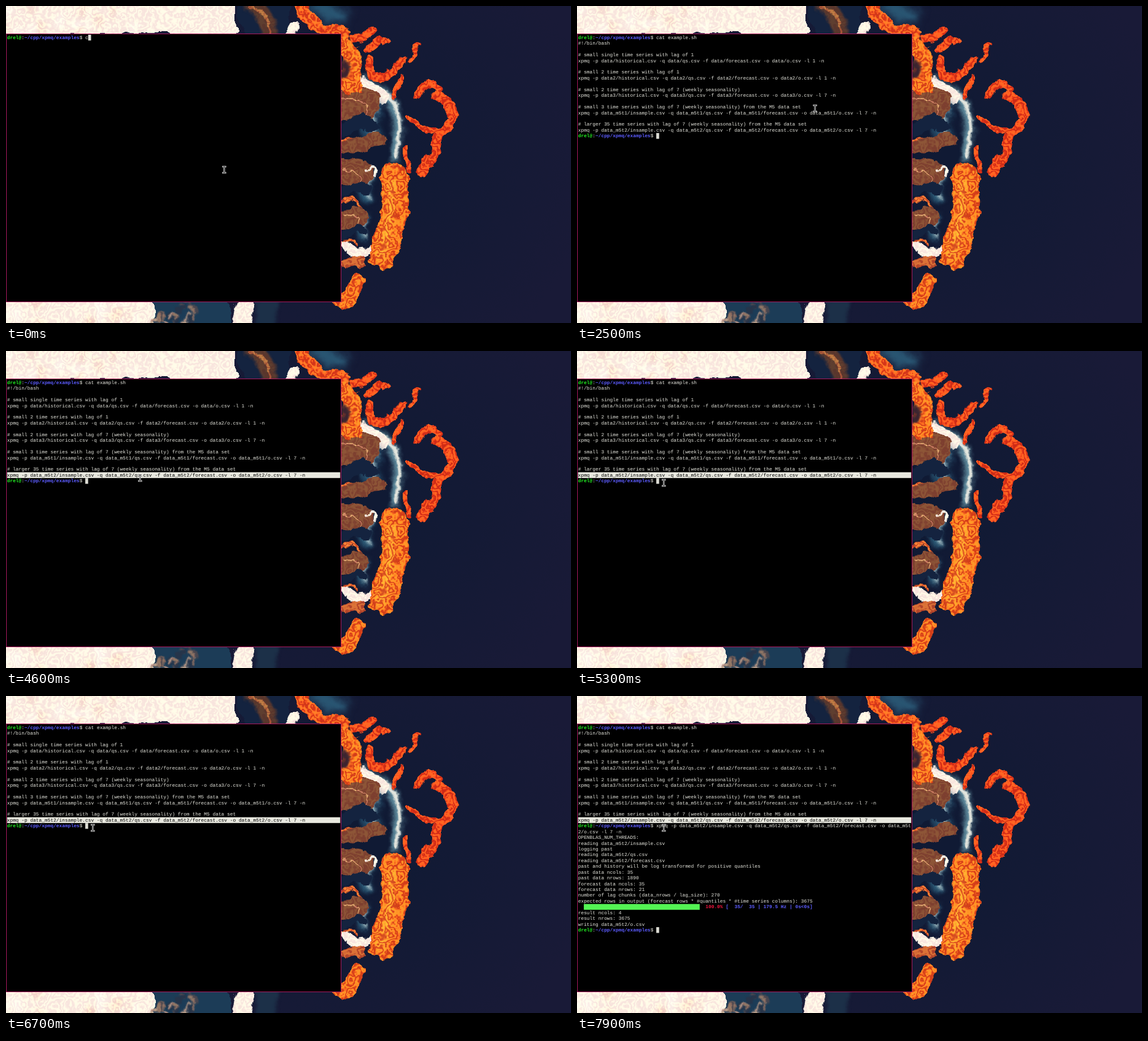
Recreate the animation shown at these times as an HTML page with a canvas. Size 920 px wide and 517 px high, loop 8000 ms.

```html
<!DOCTYPE html>
<html lang="en">
<head>
<meta charset="utf-8">
<title>Terminal session</title>
<style>
html, body { margin: 0; width: 100%; height: 100%; overflow: hidden; background: #17193a; }
canvas { display: block; width: 920px; height: 517px; }
</style>
</head>
<body>
<canvas id="stage" width="920" height="517"></canvas>
<script>
const W = 920, H = 517, LOOP = 8000, STEP = 100;
const ctx = document.getElementById('stage').getContext('2d');

// ---------- wallpaper: brush strokes, then an ink-like warp ----------
const NAVY = '#14233f', TEAL = '#2b5a77', CREAM = '#fdf0e3', BROWN = '#854a33', ORANGE = '#fa5a20';

let seed = 7;
function rnd(a, b) {
  seed = (seed * 16807) % 2147483647;
  return a + (b - a) * seed / 2147483647;
}

function layer() {
  const c = document.createElement('canvas');
  c.width = W;
  c.height = H;
  return c.getContext('2d');
}
const paint = layer(), wall = layer();

// One curved stroke: start, control point, end.
function brush(color, width, x0, y0, cx, cy, x1, y1, blur = 0.7) {
  paint.filter = `blur(${blur}px)`;
  paint.strokeStyle = color;
  paint.lineWidth = width;
  paint.lineCap = 'round';
  paint.beginPath();
  paint.moveTo(x0, y0);
  paint.quadraticCurveTo(cx, cy, x1, y1);
  paint.stroke();
  paint.filter = 'none';
}

function smears(n, x0, x1, y, colors, size, blur) {
  for (let i = 0; i < n; i++) {
    const x = rnd(x0, x1), v = y + rnd(0, 40), dx = rnd(-size, size);
    brush(colors[i % colors.length], rnd(size * 0.4, size), x, v, x + dx, v, x + dx, v + size, blur);
  }
}

function strips() {
  paint.fillStyle = CREAM;
  paint.fillRect(0, 0, 374, 46);
  paint.fillRect(0, 480, 240, 37);
  for (const y of [0, 480]) smears(14, 0, 230, y, ['#fad8c0a0', '#fff9f0'], 12, 4);

  brush(NAVY, 84, 418, -40, 418, 0, 430, 60);
  brush('#5c3a2e', 26, 398, -10, 426, 20, 434, 60, 2);
  brush('#b0663d', 4, 396, 0, 424, 12, 432, 46);
  brush(CREAM, 12, 464, 50, 466, 42, 471, 28);
  brush(TEAL, 26, 505, 0, 525, 10, 545, 16, 8);
  brush(ORANGE, 20, 480, -8, 490, 40, 552, 44);

  brush('#1c3c57', 126, 303, 470, 303, 500, 303, 530);
  smears(26, 242, 305, 478, ['#8f7062', '#27354a', '#b99a88', '#4a4750'], 8, 1);
  brush('#1c3048', 34, 424, 480, 424, 500, 424, 530, 3);
  brush(CREAM, 30, 392, 480, 386, 500, 380, 530);
}

// A pool of marbled ink with a pale right edge.
function pool(y, r) {
  const x = 552 + r;
  brush(TEAL, r * 0.5, x, y, x - 8, y + r / 2, x, y + r, 4);
  brush('#b4cacd', r * 0.16, x + 4, y, x, y + r / 2, x + 4, y + r, 2);
  brush(BROWN, r, 548, y, x, y - r / 2, x - r * 0.4, y + r * 0.2);
  brush('#d8966a', 2, 550, y - r / 4, x, y - r / 3, x - r * 0.3, y + r * 0.3);
  brush(NAVY, r * 0.5, 552, y + r * 0.8, 560 + r / 2, y + r * 0.3, x, y + r * 0.7);
  brush('#e2672f', 4, 546, y + r * 1.2, 566, y + r, x - 10, y + r * 1.5);
}

function face() {
  brush('#5f8c9e', 15, 588, 124, 654, 160, 632, 246, 4);
  brush('#e4e6de', 6, 588, 122, 658, 158, 637, 244, 1.2);
  brush(CREAM, 18, 584, 126, 602, 130, 614, 152);
  for (const [y, r] of [[164, 46], [276, 36], [348, 30]]) pool(y, r);
  brush(BROWN, 24, 546, 232, 585, 222, 604, 220);
  brush(CREAM, 4, 590, 264, 604, 262, 597, 276);
  brush(CREAM, 12, 550, 388, 570, 414, 596, 396);
  brush('#c65a30', 14, 550, 420, 565, 406, 580, 416);
}

function flames() {
  const hot = (...a) => brush('#f5491d', ...a);
  const warm = (...a) => brush('#fc6a20', ...a);
  warm(30, 552, 66, 572, 90, 562, 130);
  brush('#3a2430', 12, 550, 92, 562, 104, 550, 116, 2);
  hot(11, 566, 52, 586, 50, 596, 38);
  hot(12, 588, 68, 612, 46, 620, 58);
  hot(12, 592, 84, 586, 112, 606, 115);
  hot(14, 602, 113, 634, 112, 648, 88);
  hot(6, 672, 62, 668, 76, 661, 86);
  hot(9, 645, 119, 636, 130, 630, 147);
  hot(15, 670, 142, 690, 116, 704, 136);
  hot(16, 700, 148, 754, 172, 706, 206);
  hot(11, 656, 180, 672, 198, 704, 206);
  hot(17, 704, 214, 700, 246, 674, 269);
  hot(8, 654, 234, 656, 250, 653, 264);
  warm(44, 630, 278, 642, 335, 612, 408);
  brush('#ff8a2c', 14, 626, 290, 630, 350, 608, 412, 5);
  warm(26, 573, 446, 572, 470, 546, 482);
}

const lattice = Float32Array.from({ length: 4096 }, () => rnd(-1, 1));
const knot = (i, j) => lattice[(i & 63) * 64 + (j & 63)];
const lerp = (a, b, k) => a + (b - a) * k;

function noise(x, y) {
  const i = Math.floor(x), j = Math.floor(y);
  const u = x - i, v = y - j, s = u * u * (3 - 2 * u), q = v * v * (3 - 2 * v);
  return lerp(lerp(knot(i, j), knot(i + 1, j), s), lerp(knot(i, j + 1), knot(i + 1, j + 1), s), q);
}

const rough = (x, y) => noise(x / 20, y / 20) + noise(x / 8, y / 8) * 0.5 + noise(x / 3, y / 3) * 0.2;
const clamp = (v, top) => Math.max(0, Math.min(top, Math.round(v)));

// Shifts each pixel along the noise and streaks the warm colours.
function warp() {
  const src = paint.getImageData(0, 0, W, H).data;
  const out = wall.createImageData(W, H), px = out.data;
  for (let y = 0; y < H; y++) {
    for (let x = 0; x < W; x++) {
      const a = rough(x, y), b = rough(x + 300, y + 90);
      const from = 4 * (clamp(y + b * 5, H - 1) * W + clamp(x + a * 5, W - 1));
      const to = 4 * (y * W + x);
      const heat = Math.max(0, src[from] - src[from + 2]) / 255;
      const streak = 0.5 * heat * Math.sin(7 * (a + b) + x / 9);
      px[to] = src[from] * (1 + streak * 0.4);
      px[to + 1] = src[from + 1] * (1 + streak);
      px[to + 2] = src[from + 2] * (1 + streak * 0.5);
      px[to + 3] = 255;
    }
  }
  wall.putImageData(out, 0, 0);
}

function paintWall() {
  const dusk = paint.createRadialGradient(560, 240, 60, 560, 240, 400);
  dusk.addColorStop(0, '#101a34');
  dusk.addColorStop(1, '#191a37');
  paint.fillStyle = dusk;
  paint.fillRect(0, 0, W, H);
  strips();
  face();
  flames();
  warp();
  wall.fillStyle = '#000';
  wall.fillRect(0, 45, 546, 438);
  wall.strokeStyle = '#a8195e';
  wall.strokeRect(0.5, 45.5, 545, 437);
}

// ---------- terminal ----------
const CW = 10, CH = 20, COLS = 115, SCALE = 0.4717;
const FG = '#e6e6de', GREEN = '#22ef22', BLUE = '#5c5cff', RED = '#f3153f', BAR = '#54f454';
const USER = 'drel@', PATH = '~/cpp/xpmq/examples', PROMPT = 27;

const command = (dir, past, lag) =>
  `xpmq -p ${dir}/${past}.csv -q ${dir}/qs.csv -f ${dir}/forecast.csv -o ${dir}/o.csv -l ${lag} -n`;
const RUN = command('data_m5t2', 'insample', 7);

const SCRIPT = [
  '#!/bin/bash', '',
  '# small single time series with lag of 1', command('data', 'historical', 1), '',
  '# small 2 time series with lag of 1', command('data2', 'historical', 1), '',
  '# small 2 time series with lag of 7 (weekly seasonality)', command('data3', 'historical', 7), '',
  '# small 3 time series with lag of 7 (weekly seasonality) from the M5 data set',
  command('data_m5t1', 'insample', 7), '',
  '# larger 35 time series with lag of 7 (weekly seasonality) from the M5 data set', RUN
];

const LOG = [
  'OPENBLAS_NUM_THREADS:', 'reading data_m5t2/insample.csv', 'logging past',
  'reading data_m5t2/qs.csv', 'reading data_m5t2/forecast.csv',
  'past and history will be log transformed for positive quantiles',
  'past data ncols: 35', 'past data nrows: 1890',
  'forecast data ncols: 35', 'forecast data nrows: 21',
  'number of lag chunks (data_nrows / lag_size): 270',
  'expected rows in output (forecast rows * #quantiles * #time series columns): 3675'
];
const RESULT = ['result ncols: 4', 'result nrows: 3675', 'writing data_m5t2/o.csv'];

function put(row, col, text, color = FG, bold = false) {
  ctx.font = `${bold ? 'bold ' : ''}16.66px "Liberation Mono", monospace`;
  ctx.fillStyle = color;
  ctx.fillText(text, col * CW, row * CH + 15);
}

function cells(row, col, n, color) {
  ctx.fillStyle = color;
  ctx.fillRect(col * CW, row * CH, n * CW, CH);
}

function prompt(row) {
  put(row, 0, USER, GREEN, true);
  put(row, 5, ':');
  put(row, 6, PATH, BLUE, true);
  put(row, 25, '$');
}

const caret = (row, col) => cells(row, col, 1, '#dcdcd4');

function progress(row, done, rate) {
  const p = done / 35;
  cells(row, 2, 40 * p, BAR);
  put(row, 44, (p * 100).toFixed(1).padStart(5) + '%', RED, true);
  put(row, 51, `[${String(done).padStart(4)}/  35 | ${rate} Hz | 0s<0s]`, BLUE, true);
}

function typed(t) {
  return t < 900 ? 'cat example.sh'.slice(0, 1 + t / STEP) : 'cat example.sh ';
}

function terminal(t) {
  prompt(0);
  const line = typed(t);
  put(0, PROMPT, line);
  if (t < 1700) return caret(0, PROMPT + line.length);

  SCRIPT.forEach((s, i) => put(i + 1, 0, s));
  if (t >= 3900) {
    const whole = t >= 4000, from = whole ? 0 : 34, to = whole ? COLS : 50;
    cells(16, from, to - from, '#e8e8df');
    put(16, from, RUN.slice(from, to), '#000');
  }
  prompt(17);
  if (t < 6800) return caret(17, PROMPT);

  const fit = COLS - PROMPT;
  put(17, PROMPT, RUN.slice(0, fit));
  put(18, 0, RUN.slice(fit));
  if (t < 7300) return caret(18, RUN.length - fit);

  LOG.forEach((s, i) => put(19 + i, 0, s));
  if (t < 7400) return caret(31, 0);
  if (t < 7500) return progress(31, 19, '178.2');
  progress(31, 35, '179.5');
  RESULT.forEach((s, i) => put(32 + i, 0, s));
  prompt(35);
  caret(35, PROMPT);
}

// ---------- mouse: three glides along cubic curves ----------
const GLIDES = [
  { from: 2100, to: 2900, xs: [355, 468, 370, 229], ys: [267, 215, 75, 199] },
  { from: 4000, to: 4600, xs: [229, 225, 222, 218], ys: [199, 202, 205, 207] },
  { from: 4700, to: 5300, xs: [218, 125, 100, 141], ys: [207, 211, 213, 215] }
];

function bezier([a, b, c, d], k) {
  const m = 1 - k;
  return m * m * m * a + 3 * m * m * k * b + 3 * m * k * k * c + k * k * k * d;
}

function mouse(t) {
  const glide = GLIDES.findLast(s => t >= s.from) || GLIDES[0];
  const k = Math.max(0, Math.min(1, (t - glide.from) / (glide.to - glide.from)));
  const x = bezier(glide.xs, k) + 0.3, y = bezier(glide.ys, k);
  ctx.lineCap = 'square';
  for (const [color, width] of [['#e8e8e8', 2.4], ['#000', 0.8]]) {
    ctx.strokeStyle = color;
    ctx.lineWidth = width;
    ctx.beginPath();
    for (const end of [y - 5, y + 5]) {
      ctx.moveTo(x - 2, end);
      ctx.lineTo(x + 2, end);
    }
    ctx.moveTo(x, y - 4.5);
    ctx.lineTo(x, y + 4.5);
    ctx.stroke();
  }
}

// ---------- loop ----------
function draw(t) {
  ctx.setTransform(1, 0, 0, 1, 0, 0);
  ctx.drawImage(wall.canvas, 0, 0);
  ctx.setTransform(SCALE, 0, 0, SCALE, 1.7, 46.8);
  ctx.textRendering = 'geometricPrecision';
  terminal(t);
  ctx.setTransform(1, 0, 0, 1, 0, 0);
  mouse(t);
}

paintWall();
const start = performance.now();
function tick() {
  const t = (performance.now() - start) % LOOP;
  draw(Math.floor(t / STEP) * STEP);
  requestAnimationFrame(tick);
}
tick();
</script>
</body>
</html>
```
